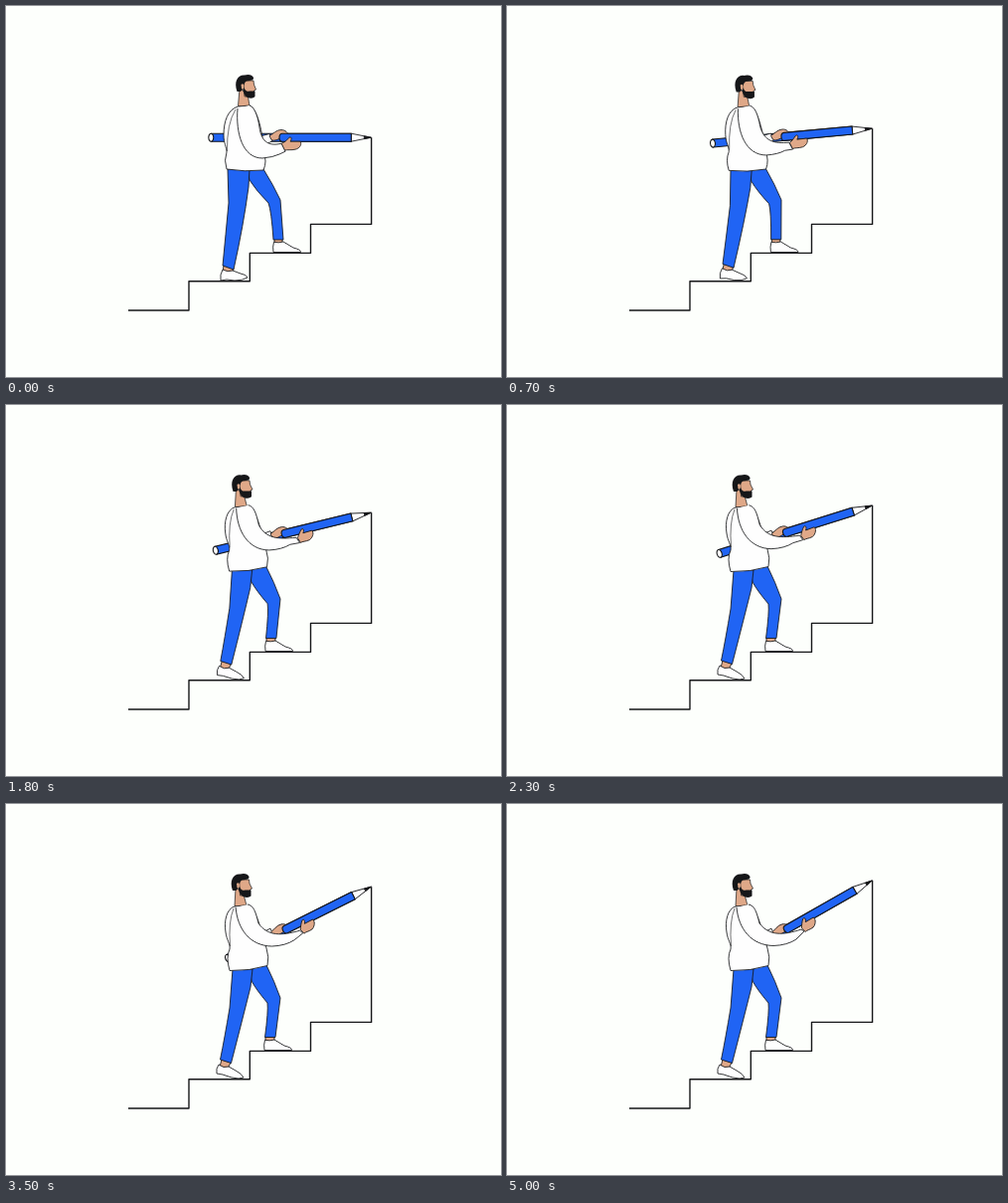
An HTML page with a canvas for the animation above (5.1 s loop, 498 by 373 pixels).

```html
<!DOCTYPE html>
<html lang="en">
<head>
<meta charset="utf-8">
<title>Drawing the next step</title>
<style>
  html, body { margin: 0; width: 100%; height: 100%; overflow: hidden; background: #fdfffc; }
  canvas { display: block; }
</style>
</head>
<body>
<canvas id="stage" width="498" height="373"></canvas>
<script>
const ctx = document.getElementById('stage').getContext('2d');
const PAPER = '#fdfffc', BLUE = '#2064f4', SKIN = '#dfa888', INK = '#161719', WHITE = '#fefefe';
const LOOP = 5100, STEP = 100, TIP_X = 367.3, LENGTH = 161;

// Blend two path strings that share the same structure.
function mix(a, b, k) {
  const ends = b.match(/-?[\d.]+/g);
  let i = 0;
  return a.replace(/-?[\d.]+/g, n => ' ' + (+n + (ends[i++] - n) * k).toFixed(2));
}

function draw(path, fill, line = 0.85) {
  const shape = new Path2D(path);
  if (fill) {
    ctx.fillStyle = fill;
    ctx.fill(shape);
  }
  if (line) {
    ctx.strokeStyle = INK;
    ctx.lineWidth = line;
    ctx.stroke(shape);
  }
}

function placed(x, y, angle, paint) {
  ctx.save();
  ctx.translate(x, y);
  ctx.rotate(angle);
  paint();
  ctx.restore();
}

// Each part: fill, path at the start of the lean, path at its end.
const legs = [
  [SKIN, 'M219 261L218 267L227 269L229 264Z', 'M217 257L215 264L223 266L226 260Z'],
  [SKIN, 'M270 234V239H278V234Z', 'M261 234V239H270V234Z'],
  [WHITE, 'M218 265Q215 270 216 276L222 275L230 276Q238 276 243 273Q242 270 236 269L228 266Q223 268 218 265Z',
          'M214 262Q211 266 212 271L218 272L227 275Q235 277 239 275Q237 271 231 268L224 264Q219 266 214 262Z'],
  [WHITE, 'M269.5 237.3Q268 242 269 247.5H296.5Q297 245 289 243L279 237Q274 238.5 269.5 237.3Z',
          'M260.5 237.3Q259 242 260 247.5H287.5Q288 245 280 243L270 237Q265 238.5 260.5 237.3Z'],
  [BLUE, 'M243 164L259 164Q269 180 276 195L279 235L269 235Q267 206 264 198Q252 186 245 175Z',
         'M245 165L262 162Q270 178 276 195L271 234.5L260.5 234.5Q264 208 263 200Q252 187 247 178Z'],
  [BLUE, 'M223 164L224 198Q221 230 218 261L229 265Q239 220 244 182L245 164Z',
         'M228 166L225 205Q220 235 215.5 257L226.5 260.5Q238 216 246 184L248 166Z']
];

const torso = [WHITE,
  'M233.5 101C223 104 219 116 219 130C219 138 222 142 222 147Q219 155 222 164Q240 167 259 165Q263 156 259 147C259 134 255 106 245 100Z',
  'M230 103C222 105 219 118 221 129C222 137 226 141 225 146Q221 154 225 167.5Q245 168 263 162.5Q265 154 262 145C258 132 253 107 243 101.5Z'];

const head = [
  [SKIN, 'M235 83L233.5 100.5Q239 103 245 100.5L243 88Z', 'M231 84L230 102.5Q236 105 242 102L238.5 89Z', 0.7],
  [SKIN, 'M239 75H249L249.5 79L251.5 84L249.5 85V91H240Z', 'M234.5 76H244.5L245 80L247.5 85L245.5 86V92H235.5Z', 0.7],
  [INK, 'M232.5 86C229 76 233 69 240 69.5Q247 68 249 72Q250 75 242 75.5Q239 77 239.5 82L236 86Z',
        'M228 87C224.5 77 228.5 70 235.5 70.5Q242.5 69 244.5 73Q245.5 76 237.5 76.5Q234.5 78 235 83L231.5 87Z', 0],
  [INK, 'M239 80C240 86 243 86 245 85.5L250.5 85.5V91Q248 94 243 92Q239 90 238 83Z',
        'M234.5 81C235.5 87 238.5 87 240.5 86.5L246.5 86.5V92.5Q243.5 95 238.5 93Q234.5 91 233.5 84Z', 0],
  [SKIN, 'M236.5 79Q239.5 77 239.5 81Q239 85 237 83Z', 'M232 80Q235 78 235 82Q234.5 86 232.5 84Z', 0]
];

function pencil(y, angle) {
  placed(TIP_X, y, -angle, () => {
    draw(`M${-LENGTH} -4H-20V4H${-LENGTH}Z`, BLUE, 1.1);
    draw('M-20 -4L0 0L-20 4Z', WHITE);
    draw('M-7 -1.4L0 0L-7 1.4Z', INK);
    draw(`M${-LENGTH} -4a2.5 4 0 1 0 .01 0Z`, WHITE, 1.1);
  });
}

function render(ms) {
  const lean = 1 - Math.max(0, 1 - ms / 2300) ** 1.4;
  const t = Math.min(ms / 1000, 3.9);
  const raise = t / 3.9;
  const reach = (lean + raise) / 2;
  const angle = raise * 29.6 * Math.PI / 180;
  const tipY = 132.2 - 12.6 * t - 0.4 * t * t;
  const onPencil = x => tipY + (TIP_X - x) * Math.tan(angle);
  const part = ([fill, a, b, line]) => draw(mix(a, b, lean), fill, line);

  ctx.fillStyle = PAPER;
  ctx.fillRect(0, 0, 498, 373);
  ctx.lineJoin = 'round';
  draw(`M123 306H184V276.7H245.3V248.4H306.5V219.4H367.6V${tipY}`, null, 1.4);

  pencil(tipY, angle);

  const farX = 275 + lean, farY = onPencil(farX) - 2.7;
  draw(`M252 132L${farX - 10} ${farY - 1}L${farX - 7} ${farY + 6}L256 143Z`, WHITE);
  placed(farX, farY, -angle * 0.4, () =>
    draw('M-10 1C-6 -1 -3 -5 2 -5C6 -5 9 -2 9 1L0 4C-4 6 -7 6 -8 5Z', SKIN, 0.8));

  // The gripped end lies over the far palm.
  placed(TIP_X, tipY, -angle, () => {
    const end = (farX + 3 * raise - TIP_X) / Math.cos(angle);
    draw(`M-20 -4H${end + 3}Q${end} -4 ${end} 0Q${end} 4 ${end + 3} 4H-20Z`, BLUE, 1.1);
  });

  legs.forEach(part);
  part(head[0]);
  part(torso);
  head.slice(1).forEach(part);
  draw(mix('M231 104Q222 118 222.5 146', 'M229 105Q223.5 118 225.5 143', lean), null, 0.6);

  const nearX = 287 + 15 * lean, nearY = onPencil(nearX) + 6;
  placed(nearX, nearY, -angle * 0.8, () =>
    draw(mix('M-10 0C-6 -1 -4 -4 -2 -6C0 -7 1 -5 -1 -2L9 -2C11 0 9 5 4 6C0 7 -4 6 -7 7Z',
             'M-7 2C-6 0 -4 -4 -2 -6C0 -7 1 -5 -1 -2L8 -3C10 -1 8 4 4 6C0 7 -3 6 -5 7Z', lean), SKIN, 0.8));

  const lower = `L${nearX - 6 + 3 * raise} ${nearY + 8}`;
  const upper = `L${nearX - 10 + 4 * raise} ${nearY + 6 * raise}`;
  draw(
    mix('M233 103C231 128 238 153 258 153Q269 152 275 149', 'M231 104C233 126 246 142 268 142.5Q282 142 291 136', reach) +
    lower + upper +
    mix('C266 141 257 138 255 122C253 108 249 101 245 100', 'C278 132 264 133 254 120C251 108 249 102 243 101', reach),
    WHITE);
}

function tick() {
  const ms = performance.now() % LOOP;
  render(Math.floor(ms / STEP) * STEP);
  requestAnimationFrame(tick);
}
tick();
</script>
</body>
</html>
```
